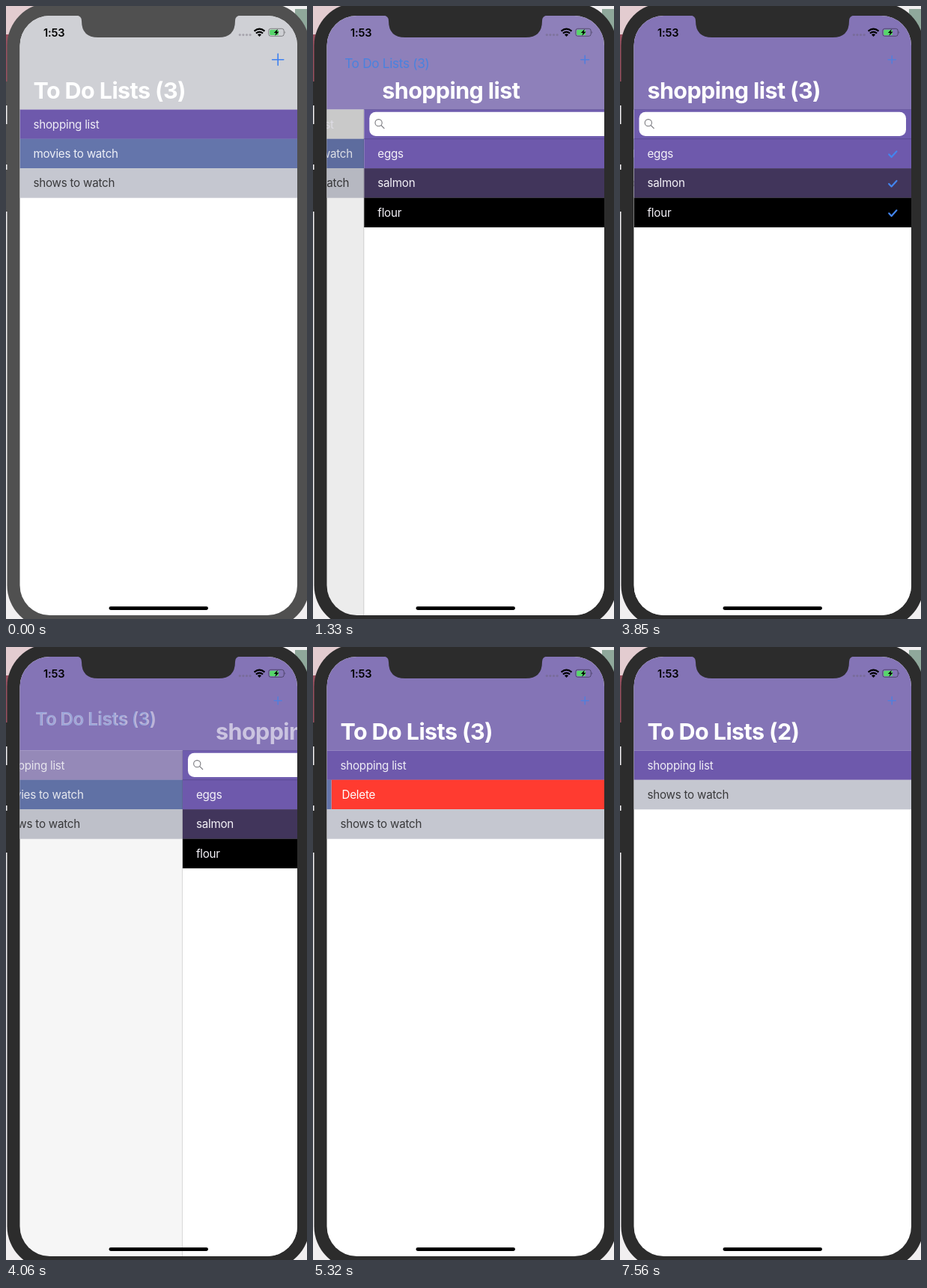
Write an HTML page that moves like this. It is 402x820 px and loops after 7.91 s.

```html
<!DOCTYPE html>
<html lang="en">
<head>
<meta charset="utf-8">
<title>To do lists</title>
<style>
html, body { margin: 0; width: 100%; height: 100%; overflow: hidden; background: #f1eff0; }
svg { display: block; width: 402px; height: 820px; }
text { font-family: Inter, "Liberation Sans", sans-serif; white-space: pre; }
.row { font-size: 15.2px; letter-spacing: -.25px; }
.title { font-size: 30.5px; font-weight: 700; letter-spacing: -.6px; fill: #fff; }
.blue { fill: #4a82de; }
.line { fill: none; stroke-linecap: round; stroke-linejoin: round; }
</style>
</head>
<body>
<svg id="stage" viewBox="0 0 402 820">
  <defs>
    <clipPath id="screen"><rect x="18.5" y="13" width="370.5" height="802" rx="40"/></clipPath>
  </defs>
  <rect width="402" height="820" fill="#f1eff0"/>
  <rect width="40" height="40" fill="#e3ccd0"/>
  <rect y="38" width="4" height="64" fill="#98505f"/>
  <rect x="386" y="4" width="16" height="40" fill="#8fa89b"/>
  <g id="bezel">
    <rect x="0" y="101" width="4" height="32"/>
    <rect x="0" y="158" width="4" height="54"/>
    <rect x="0" y="219" width="4" height="56"/>
    <rect x="1.5" y="-4" width="404" height="836" rx="57"/>
  </g>
  <g clip-path="url(#screen)">
    <rect x="18" y="13" width="372" height="803" fill="#fff"/>
    <g id="lists"></g>
    <rect id="dim" x="18" y="138" width="372" height="680"/>
    <g id="items"></g>
    <rect id="nav" x="18" y="13" width="372" height="125.3"/>
    <text id="listsTitle" class="title"></text>
    <text id="listsBack" class="title blue" style="fill:#4a82de;font-weight:400">To Do Lists (3)</text>
    <text id="itemsTitle" class="title" y="124"></text>
    <g id="back">
      <path class="line" d="M38 64.5L31 72L38 79.5" stroke="#3f82e8" stroke-width="2.4"/>
      <text class="row blue" x="43" y="77">Back</text>
    </g>
    <path id="plus" class="line"/>
    <text x="50" y="40.5" font-size="14.6" font-weight="600" letter-spacing="-.2">1:53</text>
    <g id="status"></g>
  </g>
  <path id="notch" d="M94 12.5Q101 13 101 20Q101 42 123 42H284Q306 42 306 20Q306 13 313 12.5Z"/>
  <rect x="137.5" y="803.3" width="132.5" height="4.6" rx="2.3"/>
</svg>
<script>
const LOOP = 7910, LEFT = 18.5, WIDTH = 370.5, TOP = 138.3, ROW = 39.4;
const BLUE = '#4385ee';
const $ = id => document.getElementById(id);

function add(parent, tag, attrs, text) {
  const el = document.createElementNS('http://www.w3.org/2000/svg', tag);
  set(el, attrs);
  if (text) el.textContent = text;
  parent.append(el);
  return el;
}
function set(el, attrs) {
  for (const k in attrs) el.setAttribute(k, attrs[k]);
}
const clamp = v => Math.max(0, Math.min(1, v));
const ramp = (t, a, b) => clamp((t - a) / (b - a));
const smooth = v => v * v * (3 - 2 * v);
const mix = (a, b, p) => a + (b - a) * p;
const color = (a, b, p) => `rgb(${a.map((v, i) => Math.round(mix(v, b[i], p)))})`;
const move = (el, x, y = 0) => el.setAttribute('transform', `translate(${x} ${y})`);

// Critically damped spring from 0 to 1
function spring(t, start, end) {
  if (t <= start) return 0;
  if (t >= end) return 1;
  const k = (t - start) * .014;
  return 1 - (1 + k) * Math.exp(-k);
}

function addRow(parent, index, fill, ink, label) {
  const g = add(parent, 'g', {});
  const y = TOP + index * ROW;
  const box = add(g, 'rect', { x: LEFT, y, width: WIDTH, height: ROW + .2, fill });
  add(g, 'text', { class: 'row', x: 36.5, y: y + 25.2, fill: ink }, label);
  return { g, box, y };
}

const lists = $('lists'), items = $('items'), status = $('status');

// Front list
const shopping = addRow(lists, 0, '#6e59ac', '#efedf6', 'shopping list');
const trash = add(lists, 'g', {});
const red = add(trash, 'rect', { y: TOP + ROW, fill: '#ff3b30' });
const trashLabel = add(trash, 'text', { class: 'row', y: TOP + ROW + 25, fill: '#fff' }, 'Delete');
const movies = addRow(lists, 1, '#6475ab', '#eef0f7', 'movies to watch');
const shows = addRow(lists, 2, '#c5c7d0', '#3a3a3c', 'shows to watch');

// Shopping list
add(items, 'rect', { x: LEFT, y: TOP, width: WIDTH + 1, height: 690, fill: '#fff' });
add(items, 'rect', { x: LEFT - 1, y: TOP, width: 1, height: 690, 'fill-opacity': .12 });
add(items, 'rect', { x: LEFT, y: TOP, width: WIDTH, height: ROW, fill: '#6f5cae' });
add(items, 'rect', { x: 25.5, y: 141.7, width: 356.5, height: 32.3, rx: 8.5, fill: '#fff' });
add(items, 'circle', { cx: 37.8, cy: 156.2, r: 4.6, fill: 'none', stroke: '#77777c', 'stroke-width': 1.1 });
add(items, 'path', { d: 'M41.2 159.6L45.2 163.6', class: 'line', stroke: '#77777c', 'stroke-width': 1.2 });
const checks = [
  ['eggs', '#6e59ac', 1890], ['salmon', '#41355b', 2520], ['flour', '#000', 2940]
].map(([label, fill, at], i) => {
  const row = addRow(items, i + 1, fill, '#f4f2f8', label);
  const el = add(row.g, 'path', {
    d: `M359.2 ${row.y + 20.8}l3.4 3.6l6.8 -7.6`, class: 'line', stroke: BLUE, 'stroke-width': 2.2
  });
  return { el, at };
});
for (const y of [TOP, TOP + ROW])
  add(items, 'rect', { x: LEFT, y: y - .5, width: WIDTH, height: 1, fill: '#54458f' });

// Status icons
for (let i = 0; i < 4; i++)
  add(status, 'circle', { cx: 312.3 + i * 4.6, cy: 38.6, r: 1.6, fill: '#66606f', 'fill-opacity': .38 });
add(status, 'path', { d: 'M338.5 41L335.9 38.3Q338.5 36.2 341.1 38.3Z' });
for (const [r, y] of [[4.6, 36.5], [7, 33.6]])
  add(status, 'path', {
    d: `M${338.5 - r} ${y}Q338.5 ${y - r * .85} ${338.5 + r} ${y}`,
    fill: 'none', stroke: '#000', 'stroke-width': 2.1
  });
add(status, 'rect', {
  x: 350.8, y: 30.3, width: 20.4, height: 10, rx: 2.8, fill: 'none', stroke: '#000', 'stroke-opacity': .4
});
add(status, 'rect', { x: 352.2, y: 31.7, width: 11.8, height: 7.2, rx: 1.5, fill: '#57d66b' });
add(status, 'path', { d: 'M372.4 33.6q1.8 1.7 0 3.4z', 'fill-opacity': .4 });
add(status, 'path', { d: 'M362.8 30.8L357.8 36H360.6L359.2 40L364.5 34.6H361.6Z' });

function draw(t) {
  const push = spring(t, 1080, 1680);
  const pop = spring(t, 3920, 4410);
  const open = push - pop;
  const popping = t >= 3920;

  $('bezel').setAttribute('fill', color([80, 80, 80], [44, 44, 44], ramp(t, 0, 140)));
  $('notch').setAttribute('fill', color([80, 80, 80], [44, 44, 44], ramp(t, 0, 140)));

  // Pages slide, the lower one at a third of the speed
  const shift = (1 - open) * WIDTH;
  move(items, shift);
  items.setAttribute('visibility', open > 0 ? 'visible' : 'hidden');
  move(lists, -.302 * WIDTH * open);
  $('dim').setAttribute('fill-opacity', .085 * open);
  const lit = t < 910 ? 0 : 1 - pop;
  shopping.box.setAttribute('fill', color([110, 89, 172], [217, 217, 217], lit));

  // Navigation bar
  $('nav').setAttribute('fill', color([207, 208, 213], [132, 116, 182], push));
  const arm = mix(7.6, 5, push);
  set($('plus'), {
    d: `M${363.2 - arm} 71.7h${2 * arm}M363.2 ${71.7 - arm}v${2 * arm}`,
    stroke: color([62, 128, 240], [84, 126, 218], push),
    'stroke-width': 1.6
  });

  const place = `translate(${mix(36.5, 43, open)} ${mix(124, 77, open)}) scale(${mix(1, .5, open)})`;
  set($('listsTitle'), { transform: place, opacity: clamp(1 - open * 1.3) });
  $('listsTitle').textContent = t < 5530 ? 'To Do Lists (3)' : 'To Do Lists (2)';
  set($('listsBack'), {
    transform: place,
    opacity: popping ? clamp(open * 1.2) * (1 - open) : clamp(open * 1.2) * (1 - ramp(t, 1350, 1540))
  });
  set($('itemsTitle'), {
    x: 36.5 + shift * 1.12,
    opacity: popping ? clamp(open * 1.4) : clamp(open * 3)
  });
  $('itemsTitle').textContent = t < 1890 ? 'shopping list' : 'shopping list (3)';
  $('back').setAttribute('opacity', ramp(t, 1350, 1610) * (1 - ramp(t, 3640, 3800)));

  for (const c of checks) c.el.setAttribute('visibility', t >= c.at ? 'inherit' : 'hidden');

  // Swipe to delete, then the gap closes
  const drag = 215 * smooth(ramp(t, 4760, 5180)) + (WIDTH - 215) * smooth(ramp(t, 5180, 5340));
  const close = smooth(ramp(t, 5320, 5600));
  move(movies.g, -drag);
  movies.g.setAttribute('visibility', t < 5340 ? 'visible' : 'hidden');
  trash.setAttribute('visibility', drag > 0 && close < 1 ? 'visible' : 'hidden');
  set(red, { x: LEFT + WIDTH - drag, width: drag, height: ROW * (1 - close) });
  set(trashLabel, { x: LEFT + WIDTH - drag + 14, opacity: 1 - ramp(close, 0, .4) });
  move(shows.g, 0, -ROW * close);
}

const begin = performance.now();
function tick() {
  draw((performance.now() - begin) % LOOP);
  requestAnimationFrame(tick);
}
draw(0);
requestAnimationFrame(tick);
</script>
</body>
</html>
```
